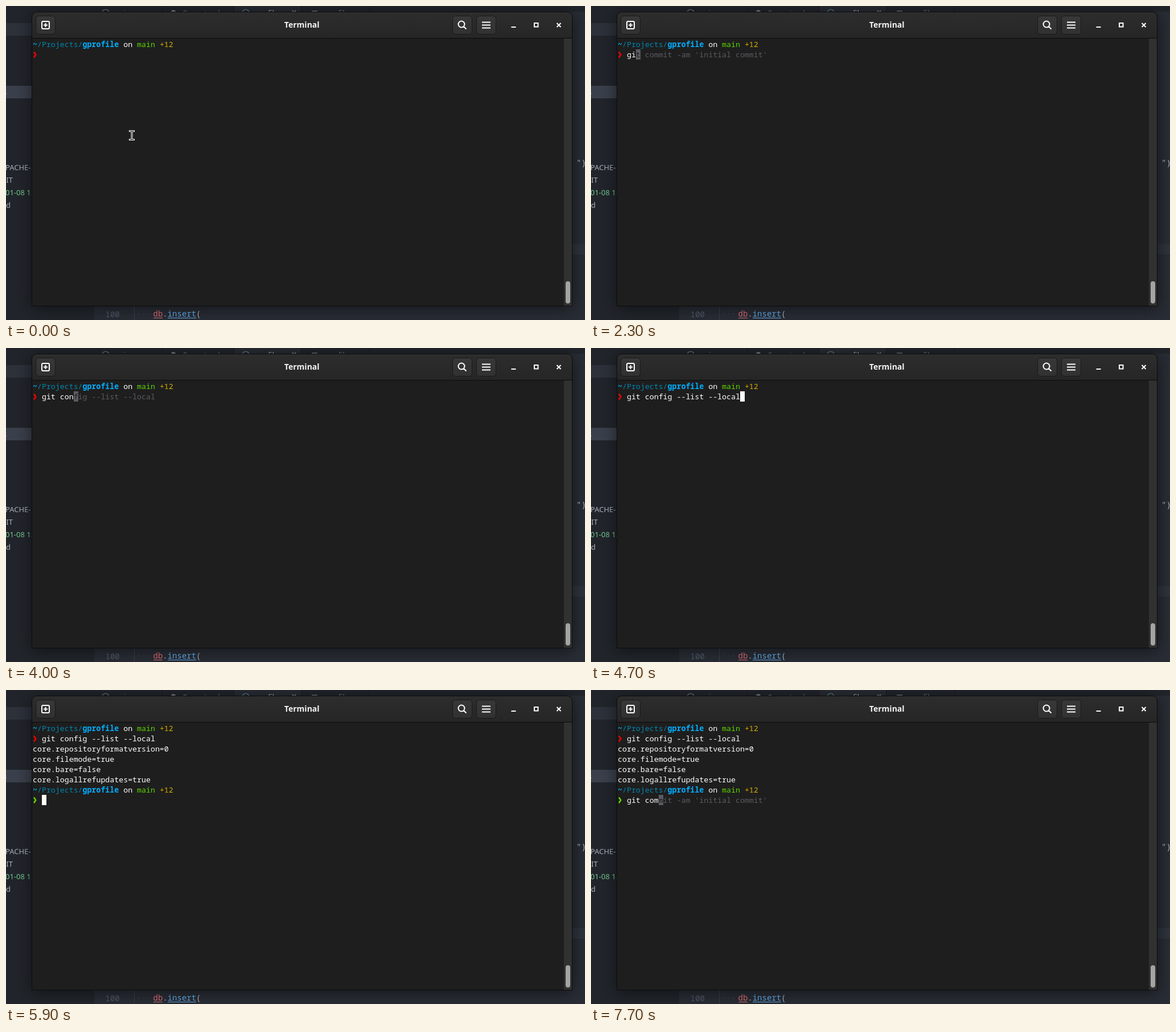
An HTML page with a canvas for the animation above (8000 ms loop, 1017x551 px).

```html
<!DOCTYPE html>
<html lang="en">
<head>
<meta charset="utf-8">
<title>Terminal session</title>
<style>
  html, body { margin: 0; width: 100%; height: 100%; overflow: hidden; background: #21252b; }
  canvas { display: block; }
</style>
</head>
<body>
<canvas id="stage" width="1017" height="551"></canvas>
<script>
const ctx = document.getElementById('stage').getContext('2d');
const LOOP = 8000;
const CELL = 7.96, LEFT = 47, TOP = 58.1, PITCH = 17.96;
const MONO = '"Noto Sans Mono", monospace';
const SANS = '"Noto Sans", sans-serif';
const TERM = `13.27px ${MONO}`;
const BG = '#1e1e1e', WHITE = '#ffffff', GHOST = '#5b5b62';
const CONFIG = 'git config --list --local';
const COMMIT = "git commit -am 'initial commit'";
const PROMPT = [
  ['~', '#00afff', true], ['/Projects/', '#0087af'], ['gprofile', '#00afff', true],
  [' on ', WHITE], ['main ', '#5fd700'], ['+12', '#d7af00']
];
const OUTPUT = [
  'core.repositoryformatversion=0', 'core.filemode=true',
  'core.bare=false', 'core.logallrefupdates=true'
];

// [start ms, typed characters, whole suggested line, cursor visible]
const STEPS = [
  [0, 0, '', false], [700, 0, '', true], [1300, 0, '', false], [1900, 0, '', true],
  [2100, 1, 'g', true], [2200, 1, COMMIT, true], [2300, 2, COMMIT, true],
  [2400, 3, COMMIT, true], [2500, 4, COMMIT, true], [3100, 5, COMMIT, true],
  [3500, 5, COMMIT, false], [3700, 6, COMMIT, true], [4000, 7, CONFIG, true],
  [4400, 7, CONFIG, false], [4700, CONFIG.length, CONFIG, true],
  [4900, 0, '', true], [5400, 0, '', false], [5900, 0, '', true],
  [6200, 3, CONFIG, true], [6700, 4, CONFIG, true], [7000, 5, CONFIG, true],
  [7400, 5, CONFIG, false], [7700, 7, COMMIT, true]
];
const FIRST_KEY = 2100, RUN = 4900;

function rect(x, y, w, h, fill) {
  ctx.fillStyle = fill;
  ctx.fillRect(x, y, w, h);
}

function rounded(x, y, w, h, radius, fill, stroke) {
  ctx.beginPath();
  ctx.roundRect(x, y, w, h, radius);
  if (fill) { ctx.fillStyle = fill; ctx.fill(); }
  if (stroke) { ctx.strokeStyle = stroke; ctx.lineWidth = 1; ctx.stroke(); }
}

function line(path, color, width) {
  ctx.strokeStyle = color;
  ctx.lineWidth = width;
  ctx.stroke(new Path2D(path));
}

function text(str, x, y, color, font, align = 'left') {
  ctx.font = font;
  ctx.fillStyle = color;
  ctx.textAlign = align;
  ctx.fillText(str, x, y);
}

function vertical(y0, y1, from, to) {
  const g = ctx.createLinearGradient(0, y0, 0, y1);
  g.addColorStop(0, from);
  g.addColorStop(1, to);
  return g;
}

function drawEditor() {
  rect(0, 0, 1017, 551, '#21252b');
  rect(155, 10, 862, 541, '#282c34');
  rect(0, 30, 46, 22, '#2c313a');
  rect(0, 140, 46, 22, '#3a404b');
  rect(990, 418, 27, 18, '#2e333d');

  rect(401, 0, 118, 10, '#282c34');
  for (const x of [275, 401, 519, 639]) rect(x - 1, 0, 1, 10, '#181a1f');
  const tabFont = `12.5px ${SANS}`, dim = '#747a85';
  line('M169 12a6 6 0 0 1 12 0', dim, 1.2);
  ctx.beginPath();
  ctx.arc(294, 11, 4, 0, 7);
  ctx.fillStyle = dim;
  ctx.fill();
  line('M415 12a6 6 0 0 1 12 0', '#5b8291', 1.2);
  line('M537 9h10', dim, 1.5);
  line('M503 8l6 6M509 8l-6 6', '#9da5b4', 1.2);
  text('main.rs', 188, 17, dim, tabFont);
  text('Cargo.toml', 310, 17, dim, tabFont);
  text('profile.rs', 440, 17, '#abb2bf', tabFont);
  text('gprofile', 556, 17, dim, tabFont);

  const treeFont = `13px ${SANS}`, tree = '#a8aeb9';
  text('s', -5, 156, tree, treeFont);
  text('PACHE-', -1, 287.5, tree, treeFont);
  text('MIT', -11.5, 309.5, tree, treeFont);
  text('01-08 15', -1, 331.5, '#73c990', treeFont);
  text('d', 0, 353.5, tree, treeFont);

  const codeFont = `14px ${MONO}`;
  text('")', 1002, 280, '#abb2bf', codeFont);
  rect(225, 527, 1, 24, '#3b4048');
  text('100', 174.5, 546, '#525a6a', codeFont);
  text('···', 229, 545, '#3b4048', codeFont);
  text('db', 258.5, 545, '#e06c75', codeFont);
  text('.', 275.3, 545, '#abb2bf', codeFont);
  text('insert', 283.7, 545, '#61afef', codeFont);
  text('(', 334.1, 545, '#abb2bf', codeFont);
  rect(259, 547, 16, 1, '#e06c75');
  rect(284, 547, 50, 1, '#61afef');
}

function drawWindow() {
  ctx.save();
  ctx.shadowColor = 'rgba(0,0,0,.55)';
  ctx.shadowBlur = 28;
  ctx.shadowOffsetY = 3;
  rounded(45, 10, 950, 517, [9, 9, 1, 1], '#0c0c0c');
  ctx.restore();
  rounded(46, 11, 948, 45, [8, 8, 0, 0], vertical(11, 56, '#2d2d2d', '#262626'));
  rect(46, 57, 948, 469, BG);
  rect(980, 57, 14, 469, '#313131');
  rounded(983, 483, 8, 39, 4, '#a4a4a3');

  for (const x of [52.5, 784.5, 826.5]) {
    rounded(x, 17.5, 34, 32, 5, vertical(17, 49, '#383838', '#313131'), '#191919');
  }
  ctx.lineCap = 'butt';
  ctx.strokeStyle = WHITE;
  ctx.lineWidth = 2;
  ctx.beginPath();
  ctx.roundRect(63, 27, 13, 13, 2);
  ctx.stroke();
  line('M66 33.5h7M69.5 30v7', WHITE, 2);
  line('M805.5 32a5.5 5.5 0 1 0-11 0a5.5 5.5 0 1 0 11 0M804 36l4.5 4.5', WHITE, 2);
  line('M836 28.5h15M836 33.5h15M836 38.5h15', WHITE, 2);
  line('M887.5 37h8', WHITE, 2);
  line('M928 30h6.5v6.5h-6.5z', WHITE, 2);
  line('M967.5 30l7 7M974.5 30l-7 7', WHITE, 2);
  text('Terminal', 519.7, 38, '#f4f4f4', `bold 14px ${SANS}`, 'center');
}

const columnX = col => LEFT + col * CELL;
const rowTop = row => TOP + row * PITCH;

function termText(str, col, row, color, bold) {
  text(str, columnX(col), rowTop(row) + 14.2, color, (bold ? 'bold ' : '') + TERM);
}

function drawPrompt(row, arrowColor) {
  let col = 0;
  for (const [str, color, bold] of PROMPT) {
    termText(str, col, row, color, bold);
    col += str.length;
  }
  ctx.save();
  ctx.translate(0, rowTop(row + 1));
  line('M49 4.6l3.3 4.9l-3.3 4.9', arrowColor, 2.5);
  ctx.restore();
}

function drawCommand(row, typed, full, cursorOn) {
  const col = 2 + typed;
  termText(full.slice(0, typed), 2, row, WHITE);
  termText(full.slice(typed), col, row, GHOST);
  if (!cursorOn) return;
  const x = Math.round(columnX(col)), y = Math.round(rowTop(row));
  rect(x, y, 8, 18, typed < full.length ? GHOST : WHITE);
  termText(full.charAt(typed), col, row, BG);
}

function drawPointer() {
  const beam = 'M217.5 219.5h7M221 219.5v15M217.5 234.5h7';
  ctx.lineCap = 'square';
  line(beam, WHITE, 3);
  line(beam, '#111111', 1);
  ctx.lineCap = 'butt';
}

function draw(time) {
  const [, typed, full, cursorOn] = STEPS.findLast(step => step[0] <= time);
  drawEditor();
  drawWindow();
  drawPrompt(0, '#ff0000');
  if (time < RUN) {
    drawCommand(1, typed, full, cursorOn);
  } else {
    drawCommand(1, CONFIG.length, CONFIG, false);
    OUTPUT.forEach((str, i) => termText(str, 0, i + 2, WHITE));
    drawPrompt(6, '#5fd700');
    drawCommand(7, typed, full, cursorOn);
  }
  if (time < FIRST_KEY) drawPointer();
}

const start = performance.now();
function frame() {
  draw((performance.now() - start) % LOOP);
  requestAnimationFrame(frame);
}
frame();
</script>
</body>
</html>
```
